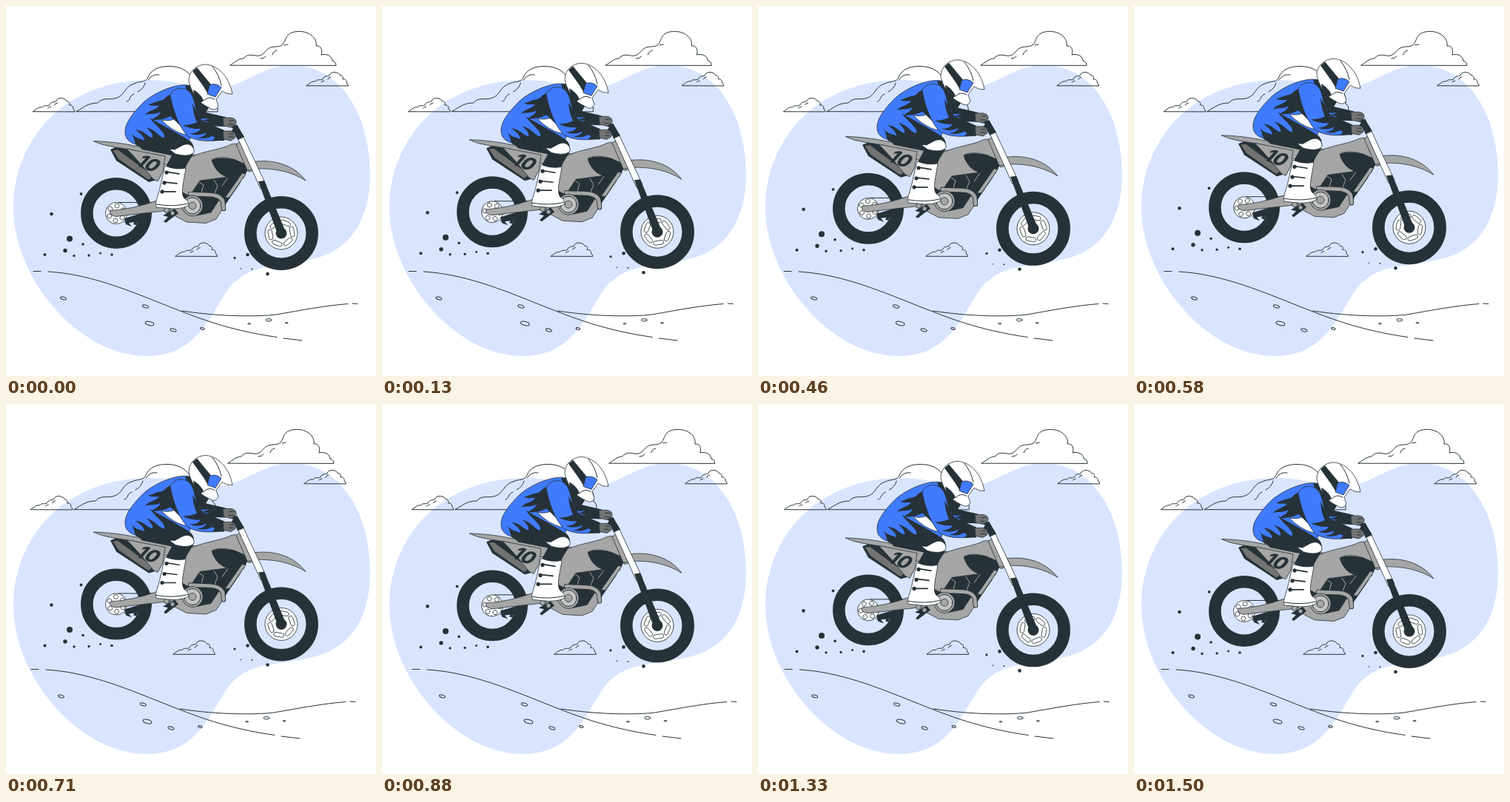
Recreate the animation shown at these times as an HTML page. Size 500x500 px, loop 1540 ms.

```html
<!DOCTYPE html>
<html lang="en">
<head>
<meta charset="utf-8">
<title>Motocross jump</title>
<style>
html, body { margin: 0; width: 100%; height: 100%; overflow: hidden; background: #fff; }
svg { display: block; width: 100vw; height: 100vh; }
.line { fill: none; stroke: #263238; stroke-width: 1; stroke-linecap: round; stroke-linejoin: round; }
.dark { fill: #263238; }
.gray { fill: #a6a6a6; }
.deep { fill: #737373; }
.blue { fill: #407bff; }
.white { fill: #fff; }
.gray, .deep, .blue, .white { stroke: #263238; stroke-width: .8; stroke-linejoin: round; }
.tire { fill: none; stroke: #263238; stroke-width: 16.5; }
text { font: 800 25px Inter, sans-serif; fill: #263238; text-anchor: middle; }
</style>
</head>
<body>
<svg viewBox="0 0 500 500">
  <defs>
    <path id="cloud" d="M0 17.5C5 14 8 11 12 12C15 8 18 11 22 9C24 4 28 5 31 4C32 -2 43 -2 46 4C49 3 50 7 49 9C53 8 55 12 54 14Q56.500 15 56.500 17.500ZM20 13q2-2 4-2M29 9q1-3 4-3"/>
    <rect id="slot" x="-6.500" y="-17.500" width="14" height="5.500" rx="2.700" transform="rotate(14)"/>
    <circle id="hole" cy="-10" r="3"/>
  </defs>

  <path fill="#d9e5ff" d="M10 272C10 190 70 100 195 100C245 100 270 122 312 105C340 94 355 80 388 80C455 82 492 150 492 228C492 285 468 325 425 339C375 354 340 346 310 372C280 398 270 473 190 473C100 473 10 370 10 272Z"/>

  <g id="scenery" class="line">
    <path d="M303 80C310 76 314 71 321 71C325 65 332 66 337 67C346 69 349 62 354 58C360 53 368 57 374 52C379 46 377 36 393 34.500C410 33 421 44 419 54C426 53 428 60 426 66C434 64 441 68 441 74Q446 75 446 80ZM344 71q5 0 7-3M360 66q1-5 6-6M376 53q3-1 5-1"/>
    <path d="M95 142.500C104 138 110 131 124 131C132 122 140 128 150 124C160 121 161 108 173 105C181 101 189 104 192 96C196 86 207 81 222 81.500C240 82 249 91 254 101C278 106 284 121 282 132Q287 134 286 142.500ZM163 129C168 129 166 121 173 119M178 116Q186 112 188 104M192 100Q198 91 207 93"/>
    <use href="#cloud" x="406" y="90"/>
    <use href="#cloud" x="36.500" y="125"/>
    <use href="#cloud" x="229" y="320.500"/>
    <path d="M37 358.500H47M57 359C110 362 160 382 210 402C260 422 300 438 366 447.500M375 449L400 452M238 412C290 420 340 420 365 417C400 411 430 405 462 402.500M468 402L475 402.500"/>
    <g id="stones"></g>
  </g>

  <g id="bike">
    <g id="dust" class="dark"></g>

    <!-- rear wheel -->
    <circle class="tire" cx="149" cy="280" r="39.700"/>
    <g transform="translate(149 280)"><g class="spin">
      <circle class="white" r="14.500"/><g id="holes" class="white"></g>
    </g></g>
    <path class="line" stroke-width="2" d="M152 265.500H200M160 292L196 282"/>
    <path class="dark" d="M160 287L190 278L194 282L182 291L166 293L170 298L162 295ZM182 283L176 296L172 295L178 283Z"/>

    <!-- exhaust, seat and tail -->
    <path class="dark" d="M141 194L150 190L204 203L207 234L193 238L149 209Z"/>
    <path class="deep" d="M144 195L151 194L200 230L192 235L152 207Z"/>
    <path class="gray" d="M118 182.500C137 183 155 185 174 189L215 197L262 202L250 216L212 214C190 195 165 194 143 190Q129 188 118 182.500Z"/>
    <path class="gray" d="M163 193L215 203L212 224L205 237L199 234Q180 210 163 193Z"/>
    <text transform="translate(187 220) rotate(22) skewX(-20)">10</text>

    <!-- engine and frame -->
    <path class="dark" d="M238 213L322 207L330 214L316 240L294 272L278 288L240 284L228 262Z"/>
    <path class="gray" d="M212 275L232 268L258 283L277 279L288 262L297 268L284 288L270 293.500L244 292Z"/>
    <path class="line" stroke-width=".8" style="stroke:#a6a6a6" d="M258 236L267 242L264 252M281 235L286 243L282 253L289 256M300 232L292 243"/>
    <path class="gray" d="M242 208C260 197 285 195 300 189C315 180 328 194 334 208L340 221L328 224L306 207C294 203 282 205 278 208C282 222 292 226 300 231L262 236L248 257L235 250Z"/>
    <path class="dark" d="M278 208C288 203 300 206 309 207L329 216L321 233L300 232C288 228 281 220 278 208Z"/>
    <path class="gray" d="M319 226L324 227L302 259L296 259Z"/>
    <path class="line" style="stroke-width:6.500" d="M249 254C270 256 288 252 293 264L294 274"/>
    <path class="line" style="stroke:#a6a6a6;stroke-width:4.700" d="M249 254C270 256 288 252 293 264L294 274"/>
    <circle class="gray" cx="252" cy="270" r="14"/>
    <circle cx="252" cy="270" r="11" fill="#c4c4c4" class="line" style="fill:#c4c4c4"/>
    <circle class="gray" cx="252" cy="270" r="5"/>
    <path class="gray" d="M141 276.500Q170 275 204 263L222 264L222 276L178 281L148 284.500Q138 282 141 276.500Z"/>
    <path class="dark" d="M212 283L228 274L233 280L221 289L216 293L213 291L219 285Z"/>
    <circle class="gray" cx="217" cy="276" r="3.500"/>
    <circle class="gray" cx="225" cy="280" r="3"/>

    <!-- front wheel, fender and fork -->
    <circle class="tire" cx="372" cy="307" r="41.700"/>
    <g transform="translate(372 307)"><g class="spin">
      <circle class="white" r="22"/><g id="slots" class="white"></g>
    </g></g>
    <circle class="dark" cx="372" cy="307" r="7.500"/>
    <path class="gray" d="M331 211C362 206 389 215 405 236C386 224 363 219 338 220Z"/>
    <path class="gray" d="M311 187L318 182L333 207L338 220L326 222Z"/>
    <path class="white" d="M312 176L319 173L352 243L344 247Z"/>
    <path class="dark" d="M341 237L349 236L377 303L368 311ZM306 164L312 160L322 177L313 181Z"/>
    <path class="line" style="stroke-width:5" d="M302 161L311 164L303 176"/>

    <!-- leg and boot -->
    <path class="dark" d="M176 186L228 177C244 176 255 184 254 195C253 205 244 210 242 222L215 219L224 202L184 194Z"/>
    <path class="white" d="M221 194C230 193 238 186 247 187Q255 190 254 198C247 204 238 202 229 200Z"/>
    <path class="white" d="M215 216Q229 222 243 219C241 234 235 253 241 260Q247 263 247 269Q241 274 225 274L203 272Q201 267 204 260C209 246 211 230 215 216Z"/>
    <path class="line" d="M203 268Q226 272 246 267"/>
    <path class="line" style="stroke-width:1.700" d="M216 224L234 227M213 238L231 240M210 251L229 251"/>
    <g class="dark"><circle cx="217" cy="225" r="2.600"/><circle cx="214" cy="239" r="2.600"/><circle cx="211" cy="251" r="2.600"/></g>

    <!-- far arm -->
    <path class="dark" d="M254 136L271 144L297 150L296 163L270 162L248 155Z"/>
    <path class="blue" d="M252 148Q263 154 276 151Q270 155 266 155L277 157Q264 160 252 156Z"/>
    <path class="deep" d="M293 151L304 151Q312 152 311 159L305 164L294 162Z"/>

    <!-- torso -->
    <path class="blue" d="M246 107C228 105 201 117 186 130C173 143 160 158 161 171C161 184 175 188 190 190L228 194L247 183L262 150L262 125Z"/>
    <path class="dark" d="M177 189C172 184 175 180 169 172C177 181 182 178 187 182C186 175 182 173 175 167C188 169 190 176 198 178C199 172 194 169 190 164C204 168 206 177 214 178C216 171 205 165 194 151C212 162 230 170 249 183L228 194Z"/>
    <path class="dark" d="M224 119C214 122 216 127 208 128C202 129 198 132 192 133C198 136 202 134 207 135C200 142 194 140 188 147C196 145 202 147 209 143C206 150 201 150 197 154C210 154 216 152 222 149L242 166L232 126Z"/>
    <path class="white" d="M210 154Q220 156 227 153Q236 163 244 168L242 174Q224 169 210 154Z"/>
    <path class="dark" d="M242 108L252 106L275 136L266 150L257 145Z"/>

    <!-- near arm -->
    <path class="blue" d="M222 121C224 112 239 107 248 116C256 124 254 139 263 153C270 162 284 165 293 168L293 181C277 183 260 184 246 176C235 166 226 143 222 121Z"/>
    <path class="dark" d="M252 132L265 155L295 168L295 182L278 182Q286 177 278 176Q269 181 258 178Q269 177 271 171Q260 177 248 172Q260 172 263 166Q250 167 239 161Q250 161 258 157Q253 147 252 132Z"/>
    <path class="deep" d="M293 169L304 169Q312 171 310 178L304 182L294 180Z"/>
    <path class="line" d="M302 155h6M301 160h6M302 173h5M301 177h6"/>

    <!-- helmet -->
    <path class="white" d="M247 101C247 88 258 79 270 79C284 80 301 92 306 119Q299 120 292 115L284 126L287 135Q284 142 277 139L268 134C258 128 249 113 247 101Z"/>
    <path class="dark" d="M252 88L258 83L277 106L273 119L267 109Z"/>
    <path class="blue" d="M275 107Q283 103 291 110L283 123L272 119Z"/>
    <path class="dark" d="M255 114Q264 120 267 128L261 132Q254 123 253 113Z"/>
    <path class="line" d="M279 82Q288 93 291 107M267 128Q274 121 282 126"/>
  </g>
</svg>
<script>
const byId = id => document.getElementById(id);
const ring = (id, part, count) => {
  byId(id).innerHTML = Array.from({ length: count },
    (_, i) => `<use href="#${part}" transform="rotate(${i * 360 / count})"/>`).join('');
};
ring('holes', 'hole', 6);
ring('slots', 'slot', 6);

byId('dust').innerHTML = [
  [86, 314.5, 4], [80, 330.5, 2.7], [61.5, 281, 2.3], [101.5, 254, 1.9], [104, 322, 1.8],
  [52.5, 336, 2], [92, 337.5, 1.7], [112, 337, 1.7], [127.5, 334, 1.5], [143, 336, 1.8],
  [309, 340.5, 1.6], [326.5, 336, 2.3], [353.5, 362, 2.3], [317.5, 355, 0.8], [332.5, 355.5, 1]
].map(([x, y, r]) => `<circle cx="${x}" cy="${y}" r="${r}"/>`).join('');

byId('stones').innerHTML = [
  [77.5, 395, 4], [188.5, 406, 4.2], [194, 429, 6], [226, 438, 4.2],
  [265.5, 436, 2.8], [328.5, 429.3, 1.8], [355, 424.3, 4], [379, 428.3, 1.8]
].map(([x, y, r]) => `<ellipse rx="${r}" ry="${r * 0.43}"
  transform="translate(${x} ${y}) rotate(${x < 300 ? 15 : 0})"/>`).join('');

const LOOP = 1540, CYCLE = 1500, PHASE = 25;
const SHAKE = [0, -1, 2, -4, 4, -4, 4, -4, 2, -1, 0];
const spinners = document.querySelectorAll('.spin');

function draw() {
  const p = (performance.now() % LOOP + PHASE) / CYCLE % 1;
  const step = Math.floor(p * 10);
  const shake = SHAKE[step] + (SHAKE[step + 1] - SHAKE[step]) * (p * 10 - step);
  const lift = 10 * (1 - Math.abs(2 * p - 1));
  byId('scenery').setAttribute('transform', `translate(${shake + 0.2} 0)`);
  byId('bike').setAttribute('transform', `translate(0 ${0.3 - lift})`);
  spinners.forEach(s => s.setAttribute('transform', `rotate(${p * 360})`));
  requestAnimationFrame(draw);
}
draw();
</script>
</body>
</html>
```
